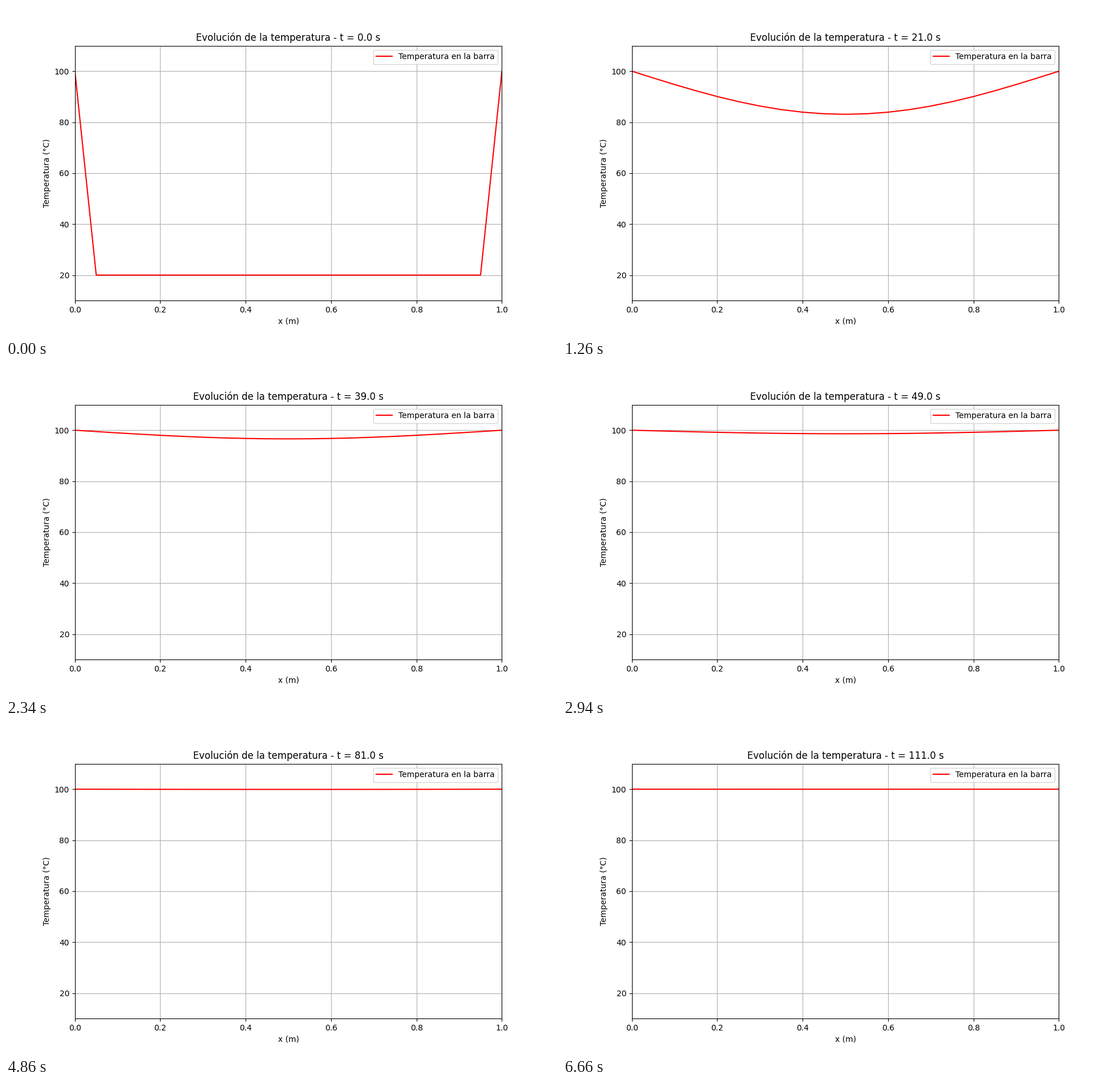
Write a matplotlib script that moves like this. It is 966 px wide and 580 px high and loops after 6.72 s.

```python
import numpy as np
import matplotlib.pyplot as plt
from matplotlib.animation import FuncAnimation

FRAMES = 112
INTERVAL = 60      # ms
DT_FRAME = 1.0     # simulated seconds per frame
SUBSTEPS = 8
FOURIER = 0.45     # alpha * dt / dx**2
NODES = 21


def step(temp):
    """Advance the bar by one explicit finite-difference step."""
    new = temp.copy()
    new[1:-1] += FOURIER * (temp[2:] - 2 * temp[1:-1] + temp[:-2])
    return new


def simulate():
    """Return the start state, then a state every SUBSTEPS steps."""
    temp = np.full(NODES, 20.0)
    temp[[0, -1]] = 100.0
    history = [temp]
    for n in range(SUBSTEPS * (FRAMES - 2) + 1):
        temp = step(temp)
        if n % SUBSTEPS == 0:
            history.append(temp)
    return history


history = simulate()
x = np.linspace(0, 1, NODES)

plt.rcParams["font.family"] = "DejaVu Sans"
fig, ax = plt.subplots(figsize=(9.66, 5.8), dpi=100)
line, = ax.plot(x, history[0], color="red", label="Temperatura en la barra")
ax.set_xlim(0, 1)
ax.set_ylim(10, 110)
ax.set_xlabel("x (m)")
ax.set_ylabel("Temperatura (°C)")
ax.grid(True)
ax.legend(loc="upper right")
title = ax.set_title("")


def update(frame):
    line.set_ydata(history[frame])
    title.set_text(f"Evolución de la temperatura - t = {frame * DT_FRAME:.1f} s")
    return line, title


anim = FuncAnimation(fig, update, frames=FRAMES, interval=INTERVAL,
                     repeat=True, blit=False)
plt.show()
```
